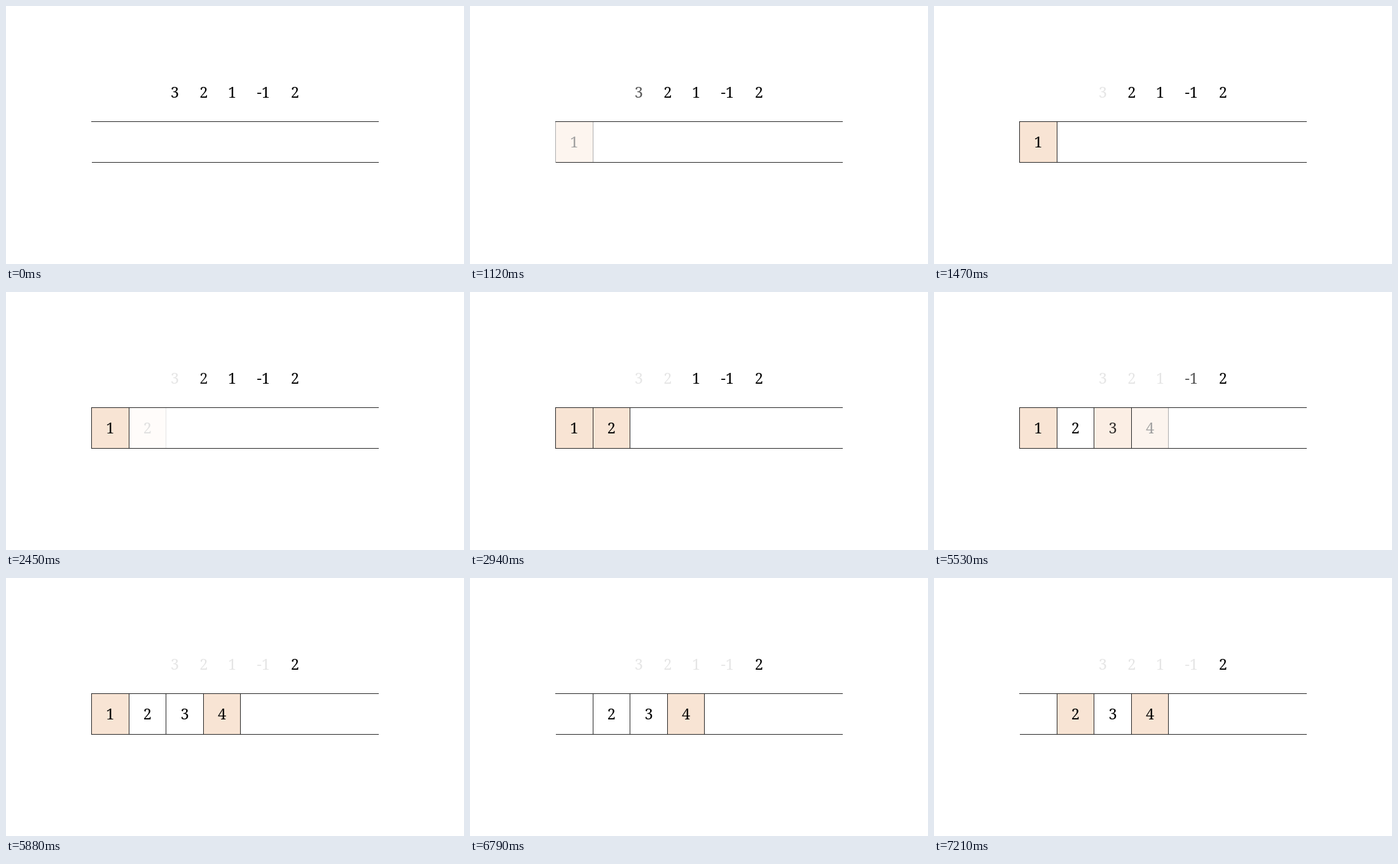
Animation, 720 px wide and 405 px high, one loop 8000 ms. Source, as an HTML page:

```html
<!DOCTYPE html>
<html lang="en">
<head>
<meta charset="utf-8">
<title>Queue</title>
<style>
html, body { margin: 0; width: 100%; height: 100%; overflow: hidden; background: #fff; }
svg { display: block; width: 100%; height: 100%; }
text { font: 23.5px "Noto Serif", "Liberation Serif", serif; text-anchor: middle; fill: #000; }
.line { fill: #262626; }
.fill { fill: #f8e4d4; }

/* One 8 s loop; every fade moves in eight steps of 70 ms. */
.anim { animation: 8s steps(8, jump-start) infinite; }

.dim1 { animation-name: dim1; }
.dim2 { animation-name: dim2; }
.dim3 { animation-name: dim3; }
.dim4 { animation-name: dim4; }
@keyframes dim1 { 0%, 12.25% { opacity: 1 } 19.25%, 100% { opacity: .1 } }
@keyframes dim2 { 0%, 30.625% { opacity: 1 } 37.625%, 100% { opacity: .1 } }
@keyframes dim3 { 0%, 49% { opacity: 1 } 56%, 100% { opacity: .1 } }
@keyframes dim4 { 0%, 67.375% { opacity: 1 } 74.375%, 100% { opacity: .1 } }

.in1 { animation-name: in1; }
.in2 { animation-name: in2; }
.in3 { animation-name: in3; }
.in4 { animation-name: in4; }
@keyframes in1 {
  0%, 12.25% { opacity: 0 }
  19.25% { opacity: 1 }
  84.875% { opacity: 1; animation-timing-function: step-start }
  84.876%, 100% { opacity: 0 }
}
@keyframes in2 { 0%, 30.625% { opacity: 0 } 37.625%, 100% { opacity: 1 } }
@keyframes in3 { 0%, 49% { opacity: 0 } 56%, 100% { opacity: 1 } }
@keyframes in4 { 0%, 67.375% { opacity: 0 } 74.375%, 100% { opacity: 1 } }

/* Highlight leaves the previous tail; the new head lights up after the pop. */
.hi2 { animation-name: hi2; }
.hi3 { animation-name: hi3; }
@keyframes hi2 {
  0%, 49% { opacity: 1 }
  56% { opacity: 0 }
  87.5% { opacity: 0; animation-timing-function: steps(2, jump-start) }
  89.25%, 100% { opacity: 1 }
}
@keyframes hi3 { 0%, 67.375% { opacity: 1 } 74.375%, 100% { opacity: 0 } }

/* The previous tail's label thins slightly while it cross-fades. */
.dip1, .dip2, .dip3 { animation-timing-function: steps(4, jump-start); }
.dip1 { animation-name: dip1; }
.dip2 { animation-name: dip2; }
.dip3 { animation-name: dip3; }
@keyframes dip1 { 0%, 30.625% { opacity: 1 } 34.125% { opacity: .75 } 37.625%, 100% { opacity: 1 } }
@keyframes dip2 { 0%, 49% { opacity: 1 } 52.5% { opacity: .75 } 56%, 100% { opacity: 1 } }
@keyframes dip3 { 0%, 67.375% { opacity: 1 } 70.875% { opacity: .75 } 74.375%, 100% { opacity: 1 } }
</style>
</head>
<body>
<svg viewBox="0 0 720 405">
  <text class="anim dim1" x="265.3" y="144">3</text>
  <text class="anim dim2" x="310.8" y="144">2</text>
  <text class="anim dim3" x="355.6" y="144">1</text>
  <text class="anim dim4" x="404.6" y="144">-1</text>
  <text x="454.3" y="144">2</text>

  <g class="anim in1">
    <rect class="fill" x="134" y="181" width="60" height="65"/>
    <path class="line" d="M134 181h1v65h-1zM193 181h1v65h-1z"/>
    <text class="anim dip1" x="163.9" y="222">1</text>
  </g>
  <g class="anim in2">
    <rect class="fill anim hi2" x="194" y="182" width="57" height="63"/>
    <path class="line" d="M193 181h1v65h-1zM251 181h1v65h-1z"/>
    <text class="anim dip2" x="222.4" y="222">2</text>
  </g>
  <g class="anim in3">
    <rect class="fill anim hi3" x="252" y="182" width="58" height="63"/>
    <path class="line" d="M251 181h1v65h-1zM310 181h1v65h-1z"/>
    <text class="anim dip3" x="281" y="222">3</text>
  </g>
  <g class="anim in4">
    <rect class="fill" x="311" y="182" width="57" height="63"/>
    <path class="line" d="M310 181h1v65h-1zM368 181h1v65h-1z"/>
    <text x="339.6" y="222">4</text>
  </g>

  <path class="line" d="M134 181h452v1h-452zM135 245h451v1h-451z"/>
</svg>
</body>
</html>
```
